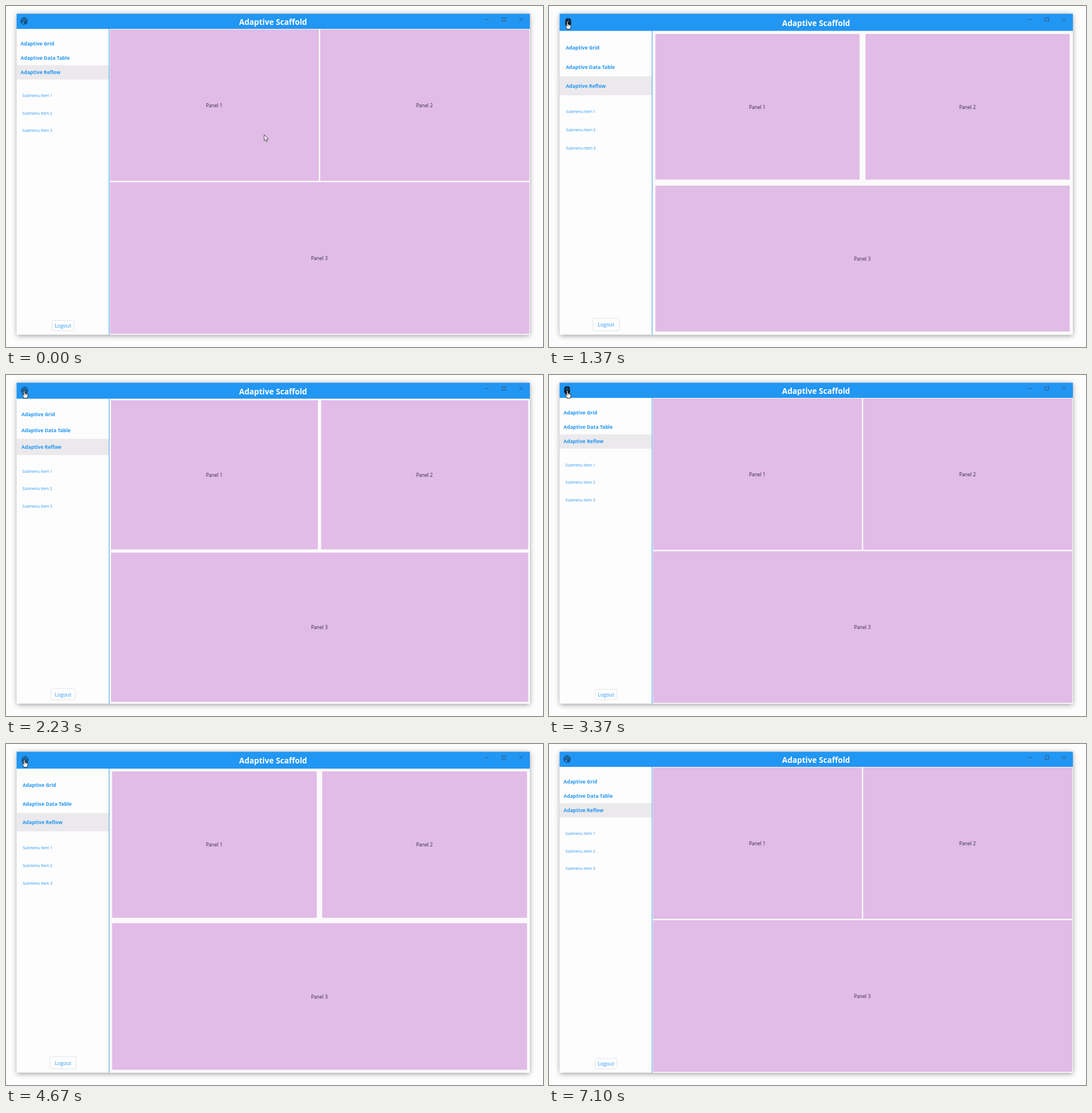
These frames come from a looping animation (940 px wide and 596 px high, 7130 ms). An HTML page with a canvas:

```html
<!DOCTYPE html>
<html lang="en">
<head>
<meta charset="utf-8">
<title>Adaptive Scaffold</title>
<style>
html, body { margin: 0; width: 940px; height: 596px; overflow: hidden; background: #fefdfe; }
canvas { display: block; width: 940px; height: 596px; }
</style>
</head>
<body>
<canvas id="stage"></canvas>
<script>
const W = 940, H = 596, LOOP = 7130;
const BLUE = '#2196f3', WHITE = '#fefdfe', PANEL = '#e1bce6';
const FONT = '"Open Sans", "Noto Sans", sans-serif';

const canvas = document.getElementById('stage');
const ctx = canvas.getContext('2d');
const dpr = window.devicePixelRatio || 1;
canvas.width = W * dpr;
canvas.height = H * dpr;

// Density toggles: start, duration, target (0 compact, 1 roomy)
const TOGGLES = [[775, 200, 1], [2085, 275, 0], [3350, 200, 1], [4585, 275, 0]];

const clamp = v => Math.max(0, Math.min(1, v));
const mix = (a, b, k) => a + (b - a) * k;
const ease = p => p < 0.5 ? 4 * p ** 3 : 1 - 4 * (1 - p) ** 3;

function density(t) {
  let k = 0, roomyIcon = false;
  for (const [start, dur, target] of TOGGLES) {
    if (t < start) break;
    k = mix(1 - target, target, ease(clamp((t - start) / dur)));
    roomyIcon = target === 1;
  }
  return { k, roomyIcon };
}

function pointer(t) {
  if (t < 5255) {
    const p = ease(clamp((t - 30) / 680));
    return { x: mix(452, 32, p), y: mix(225, 27, p) };
  }
  if (t < 5430) {
    const p = clamp((t - 5255) / 175);
    return { x: mix(32, -10, p), y: mix(27, 26, p) };
  }
  return null;
}

function box(x0, y0, x1, y1, color) {
  ctx.fillStyle = color;
  ctx.fillRect(x0, y0, x1 - x0, y1 - y0);
}

function roundBox(x0, y0, x1, y1, r) {
  ctx.beginPath();
  ctx.roundRect(x0, y0, x1 - x0, y1 - y0, r);
}

// y is the middle of the capital letters
function label(str, x, y, size, color, weight = 400, align = 'left') {
  ctx.font = `${weight} ${size}px ${FONT}`;
  ctx.textAlign = align;
  ctx.fillStyle = color;
  ctx.fillText(str, x, y + size * 0.36);
}

function line(x0, y0, x1, y1) {
  ctx.beginPath();
  ctx.moveTo(x0, y0);
  ctx.lineTo(x1, y1);
  ctx.stroke();
}

function shape(points, x, y) {
  ctx.beginPath();
  for (let i = 0; i < points.length; i += 2) ctx.lineTo(x + points[i], y + points[i + 1]);
  ctx.closePath();
}

function frameWindow() {
  box(0, 0, W, H, WHITE);
  ctx.save();
  ctx.shadowColor = 'rgba(0,0,0,0.42)';
  ctx.shadowBlur = 9 * dpr;
  ctx.shadowOffsetY = 1.5 * dpr;
  box(18.5, 13.5, 917, 574.5, WHITE);
  ctx.restore();
}

function windowButtons() {
  ctx.strokeStyle = '#38566f';
  ctx.lineWidth = 0.9;
  line(838.5, 23.5, 845, 23.5);
  ctx.strokeRect(868.5, 20.5, 6, 6);
  line(898.5, 20.5, 904.5, 26.5);
  line(904.5, 20.5, 898.5, 26.5);
}

function fingerprint(x, y) {
  ctx.strokeStyle = '#12344f';
  ctx.lineWidth = 1;
  ctx.lineCap = 'round';
  for (let i = 0; i < 4; i++) {
    const r = 5.6 - i * 1.55;
    ctx.beginPath();
    ctx.ellipse(x, y - 0.3 + i * 0.15, r, r * 1.08, 0, Math.PI * 0.82, Math.PI * 2.15);
    ctx.lineTo(x + r * 0.6, y + 5.6 - i * 0.4);
    ctx.stroke();
  }
  ctx.beginPath();
  ctx.arc(x - 0.5, y + 0.5, 5.2, Math.PI * 0.45, Math.PI * 0.85);
  ctx.stroke();
  ctx.lineCap = 'butt';
}

function mouse(x, y) {
  ctx.fillStyle = '#0b1620';
  roundBox(x - 5.2, y - 7, x + 5.2, y + 7, 5);
  ctx.fill();
  ctx.strokeStyle = BLUE;
  ctx.lineWidth = 0.8;
  line(x, y - 7, x, y - 1.4);
  line(x - 5.2, y - 1.4, x + 5.2, y - 1.4);
}

function header(k, roomyIcon) {
  box(18.5, 13.5, 917, mix(40, 43.5, k), BLUE);
  label('Adaptive Scaffold', 467.5, mix(28, 29.8, k), 13.65, '#fff', 700, 'center');
  windowButtons();
  (roomyIcon ? mouse : fingerprint)(mix(31.7, 33.6, k), mix(26.5, 28.3, k));
}

function sidebar(k) {
  box(19, mix(103.5, 123, k), 180, mix(128.5, 156, k), '#ebe9ec');
  ['Adaptive Grid', 'Adaptive Data Table', 'Adaptive Reflow'].forEach((name, i) => {
    const y = mix(65.6 + i * 25.3, 73.3 + i * 33.2, k);
    label(name, mix(25.5, 29.4, k), y, 8.62, BLUE, 700);
  });

  // Submenu rows keep a minimum height until nearly roomy
  const grow = clamp((k - 0.8) / 0.2);
  for (let i = 0; i < 3; i++) {
    const y = mix(157, 185, k) + i * (30.5 + 1.4 * grow);
    label('Submenu Item ' + (i + 1), 28.8 + 0.9 * grow, y, 6.75, BLUE);
  }

  roundBox(mix(80.5, 76.5, k), mix(549.5, 545.7, k), mix(119.2, 123.2, k), 567.5, 2);
  ctx.strokeStyle = '#dfe1e6';
  ctx.lineWidth = 0.9;
  ctx.stroke();
  label('Logout', 99.8, mix(559.2, 557.2, k), 8.8, BLUE, 500, 'center');
}

function panels(k) {
  const top = mix(40, 43.5, k);
  box(181, top, 917, 574.5, '#fcfafd');
  const left = mix(182, 186.2, k), right = mix(916, 911.5, k);
  const y0 = mix(41, 48.8, k), y1 = mix(305.6, 303.5, k);
  box(left, y0, mix(547.7, 543.6, k), y1, PANEL);
  box(mix(550, 554, k), y0, right, y1, PANEL);
  box(left, mix(308, 314, k), right, mix(573, 569, k), PANEL);
  const ink = '#32283a', y = mix(173.5, 176.6, k);
  label('Panel 1', 364.5, y, 8.5, ink, 400, 'center');
  label('Panel 2', 732.5, y, 8.5, ink, 400, 'center');
  label('Panel 3', 548.5, mix(441, 441.6, k), 8.5, ink, 400, 'center');
  box(180, top, 181, 574.5, '#3a9fea');
}

function arrow(x, y) {
  shape([0, 0, 0, 10.5, 2.4, 8.4, 4.1, 12.3, 5.8, 11.5, 4.2, 7.8, 7.4, 7.5], x, y);
  ctx.fillStyle = '#fff';
  ctx.fill();
  ctx.strokeStyle = '#222';
  ctx.lineWidth = 0.8;
  ctx.stroke();
}

function hand(x, y) {
  shape([-1, 0.6, 0, -0.2, 1, 0.6, 1.2, 5, 2.6, 4.9, 3.2, 5.5, 4.6, 5.5, 5.1, 6.3, 6.3, 6.7,
    6.6, 8.2, 5.6, 11.6, 5.2, 13.6, -0.6, 13.6, -1.2, 11.6, -3.8, 8.2, -3.4, 7.2, -2.2, 7.4, -1, 8.7], x, y);
  ctx.fillStyle = '#fff';
  ctx.fill();
  ctx.strokeStyle = '#111';
  ctx.lineWidth = 0.9;
  ctx.lineJoin = 'round';
  ctx.stroke();
  ctx.lineWidth = 0.6;
  for (const dx of [1.2, 3, 4.8]) line(x + dx, y + 5.5, x + dx, y + 8);
  ctx.lineJoin = 'miter';
}

function draw(t) {
  ctx.setTransform(dpr, 0, 0, dpr, 0, 0);
  const { k, roomyIcon } = density(t);
  frameWindow();
  sidebar(k);
  panels(k);
  header(k, roomyIcon);
  const p = pointer(t);
  if (!p) return;
  const overIcon = p.x > 24 && p.x < 42 && p.y < 40;
  (overIcon ? hand : arrow)(p.x, p.y);
}

const begin = performance.now();
function tick() {
  draw((performance.now() - begin) % LOOP);
  requestAnimationFrame(tick);
}
tick();
</script>
</body>
</html>
```
